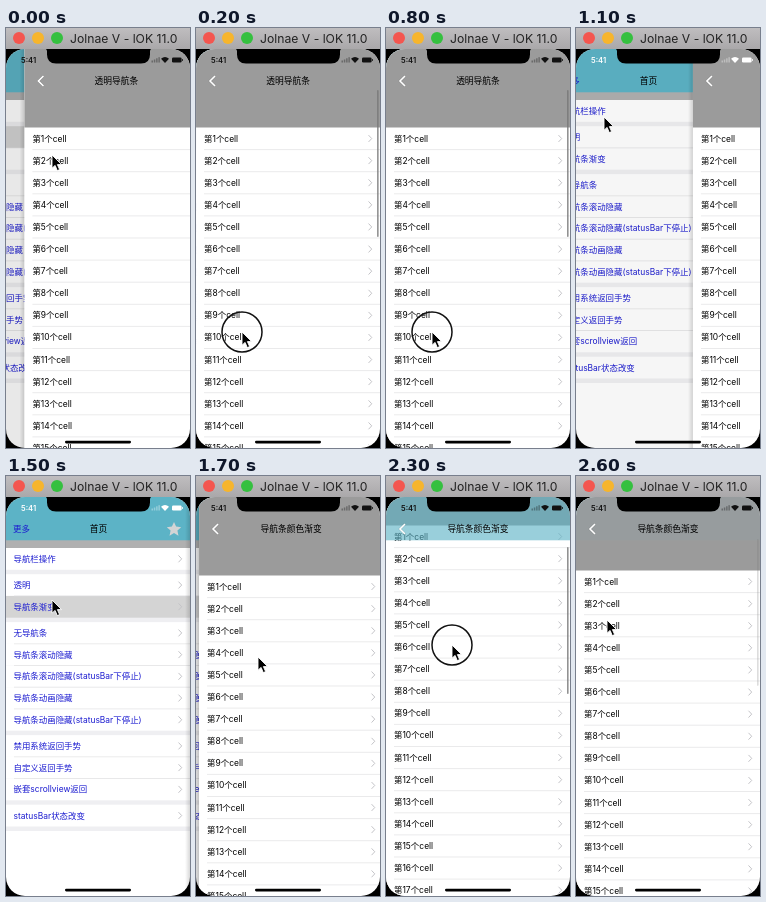
Recreate the animation shown at these times as an HTML page. Size 184x420 px, loop 2.7 s.

```html
<!DOCTYPE html>
<html lang="zh">
<head>
<meta charset="utf-8">
<title>导航条</title>
<style>
  html, body { margin: 0; width: 100%; height: 100%; overflow: hidden; background: #000; }
  svg { display: block; width: 184px; height: 420px; }
  text { font: 8.45px Inter, "Noto Sans CJK SC", "Noto Sans CJK", sans-serif; }
  .title { font-size: 8.75px; font-weight: 500; text-anchor: middle; }
  .window { font-size: 12.2px; fill: #222; }
  .time { font-size: 7.6px; font-weight: 600; }
  .link { fill: #1c1cd0; }
  .chev { fill: none; stroke: #c4c4c8; stroke-width: 1; }
  .line { stroke: #dcdcde; stroke-width: .6; }
  .bar { fill: #5cb3c6; }
</style>
</head>
<body>
<svg viewBox="0 0 184 420">
  <defs>
    <clipPath id="screen"><rect y="21" width="184" height="399" rx="19"/></clipPath>
    <linearGradient id="chrome" x2="0" y2="1">
      <stop stop-color="#bfbdbf"/><stop offset="1" stop-color="#aaa8aa"/>
    </linearGradient>
    <linearGradient id="edge">
      <stop stop-opacity="0"/><stop offset="1" stop-opacity=".15"/>
    </linearGradient>
  </defs>
  <rect width="184" height="420"/>
  <rect width="184" height="21" fill="url(#chrome)"/>
  <circle cx="13" cy="10" r="6" fill="#f4564f"/>
  <circle cx="32" cy="10" r="6" fill="#f7b52c"/>
  <circle cx="51" cy="10" r="6" fill="#35c03f"/>
  <text class="window" x="64" y="14.5">Jolnae V - lOK 11.0</text>

  <g clip-path="url(#screen)">
    <g id="home">
      <rect y="21" width="184" height="399" fill="#fff"/>
      <rect y="64" width="184" height="291" fill="#efeff2"/>
      <rect y="64" width="184" height="8" fill="#b0b0b0"/>
      <g id="menu"></g>
      <rect class="bar" y="21" width="184" height="43.3"/>
      <text class="link" x="7" y="56">更多</text>
      <text class="title" x="92.5" y="56">首页</text>
      <path id="star" fill="#d2d4d5"/>
    </g>
    <rect id="dim" y="21" width="184" height="399"/>
    <g id="page">
      <rect x="-5" y="21" width="5" height="399" fill="url(#edge)"/>
      <rect y="21" width="184" height="399" fill="#fff"/>
      <g id="list"><rect width="184" height="99.5" fill="#9b9b9b"/></g>
      <rect id="nav" class="bar" y="21" width="184" height="43.3"/>
      <g fill="none">
        <path d="M19 48l-5 5l5 5" stroke="#000" stroke-opacity=".2" stroke-width="2.3"/>
        <path d="M19 48l-5 5l5 5" stroke="#fff" stroke-width="1.7"/>
      </g>
      <text id="heading" class="title" x="92" y="56"></text>
      <rect id="thumb" x="181" width="1.6" height="147" rx=".8" fill="#777"/>
    </g>
    <g id="icons">
      <text class="time" x="15" y="34.8">5:41</text>
      <g opacity=".35">
        <rect x="145.5" y="32.5" width="1.5" height="2"/>
        <rect x="147.8" y="31.5" width="1.5" height="3"/>
        <rect x="150.1" y="30.3" width="1.5" height="4.2"/>
        <rect x="152.4" y="29.2" width="1.5" height="5.3"/>
      </g>
      <path d="M159 35l-4 -4.2q4 -3.4 8 0z"/>
      <rect x="166" y="29.5" width="9.6" height="5" rx="1.3"/>
      <rect x="176.1" y="31" width=".8" height="2"/>
    </g>
    <path d="M38 20.5q3 0 3 3v3q0 9 9 9h85q9 0 9-9v-3q0-3 3-3z"/>
    <rect x="59" y="412.8" width="66" height="2.6" rx="1.3"/>
  </g>

  <g id="cursor">
    <circle id="ring" r="20" fill="none" stroke="#111" stroke-width="1.5"/>
    <path d="M0 0V13.2L3.1 10.4L5.3 15.6L7.6 14.6L5.4 9.6H9.6Z" stroke="#fff" stroke-width=".9"/>
  </g>
</svg>
<script>
(() => {
  const $ = id => document.getElementById(id);
  const LOOP = 2700, STEP = 100, WIDTH = 184, ROW = 21.7, CELL = 22.1;

  const chevron = y => `<path class="chev" d="M172.5 ${y - 3.4}l3.2 3.4l-3.2 3.4"/>`;
  const line = y => `<path class="line" d="M8 ${y}H184"/>`;

  const groups = [
    ['导航栏操作'],
    ['透明', '导航条渐变'],
    ['无导航条', '导航条滚动隐藏', '导航条滚动隐藏(statusBar下停止)',
     '导航条动画隐藏', '导航条动画隐藏(statusBar下停止)'],
    ['禁用系统返回手势', '自定义返回手势', '嵌套scrollview返回'],
    ['statusBar状态改变']
  ];
  let rowY = 72, menu = '';
  for (const group of groups) {
    group.forEach((label, i) => {
      const mid = rowY + ROW / 2;
      menu += `<rect class="row" y="${rowY}" width="184" height="${ROW + .1}" fill="#fff"/>` +
        (i ? line(rowY) : '') +
        `<text class="link" x="7.5" y="${mid + 3}">${label}</text>` + chevron(mid);
      rowY += ROW;
    });
    rowY += 4.5;
  }
  $('menu').innerHTML = menu;
  const rows = document.querySelectorAll('.row');

  let cells = '';
  for (let i = 0; i < 24; i++) {
    const mid = 99.5 + CELL * (i + .5);
    cells += `<text x="8" y="${mid + 3}">第${i + 1}个cell</text>` +
      chevron(mid) + line(mid + CELL / 2);
  }
  $('list').innerHTML += cells;

  $('star').setAttribute('d', 'M' + Array.from({ length: 10 }, (_, i) => {
    const a = i * Math.PI / 5, r = i % 2 ? 3.6 : 7.6;
    return `${168 + r * Math.sin(a)} ${53.5 - r * Math.cos(a)}`;
  }).join('L') + 'Z');

  // Tracks hold [time, ...values]
  const pointer = [
    [0, 46, 127], [100, 46, 210], [200, 46, 304], [500, 46, 207], [600, 46, 194],
    [800, 46, 304], [900, 30, 170], [1000, 19, 57], [1100, 28, 89], [1300, 42, 112],
    [1500, 46, 124], [1700, 62, 181], [1800, 66, 219], [2100, 66, 132],
    [2200, 66, 124], [2400, 66, 214], [2600, 31, 144]
  ];
  const offset = [
    [0, 0], [200, 0], [500, 97], [600, 110], [800, 0],
    [1800, 0], [2100, 87], [2200, 95], [2400, 5], [2600, 5]
  ];
  const sample = (track, t) => {
    const i = track.findIndex(k => k[0] >= t);
    if (i < 1) return track[0].slice(1);
    const a = track[i - 1], b = track[i], p = (t - a[0]) / (b[0] - a[0]);
    return a.slice(1).map((v, j) => v + (b[j + 1] - v) * p);
  };

  // Critically damped slide, 1 to 0
  const spring = t => t < 0 ? 1 : (1 + .036 * t) * Math.exp(-.036 * t);
  const slide = t => WIDTH * (
    t < 1040 ? spring(t + 108) : t < 1500 ? 1 - spring(t - 1040) : spring(t - 1532));
  const move = (id, x, y) => $(id).setAttribute('transform', `translate(${x} ${y})`);
  const fade = (id, v) => $(id).setAttribute('opacity', v);

  function draw(t) {
    const x = slide(t), [s] = sample(offset, t), [cx, cy] = sample(pointer, t);
    const second = t >= 1500, atHome = t >= 1040 && t < 1532;
    const pressed = (t >= 200 && t <= 800) || (t >= 1800 && t <= 2400);
    move('home', -.3 * (WIDTH - x), 0);
    fade('dim', .1 * (1 - x / WIDTH));
    move('page', x, 0);
    move('list', 0, -s);
    fade('nav', second ? Math.min(1, s / 80) : 0);
    $('heading').textContent = second ? '导航条颜色渐变' : '透明导航条';
    move('thumb', 0, 62 + .18 * s);
    fade('thumb', pressed ? .8 : t > 2400 ? .25 : 0);
    $('icons').setAttribute('fill', atHome ? '#fff' : '#111');
    rows[1].setAttribute('fill', t < 1040 ? '#d4d4d4' : '#fff');
    rows[2].setAttribute('fill', second ? '#d4d4d4' : '#fff');
    move('cursor', cx, cy);
    fade('ring', pressed ? 1 : 0);
  }

  function tick() {
    draw(Math.floor(performance.now() % LOOP / STEP) * STEP);
    requestAnimationFrame(tick);
  }
  tick();
})();
</script>
</body>
</html>
```
